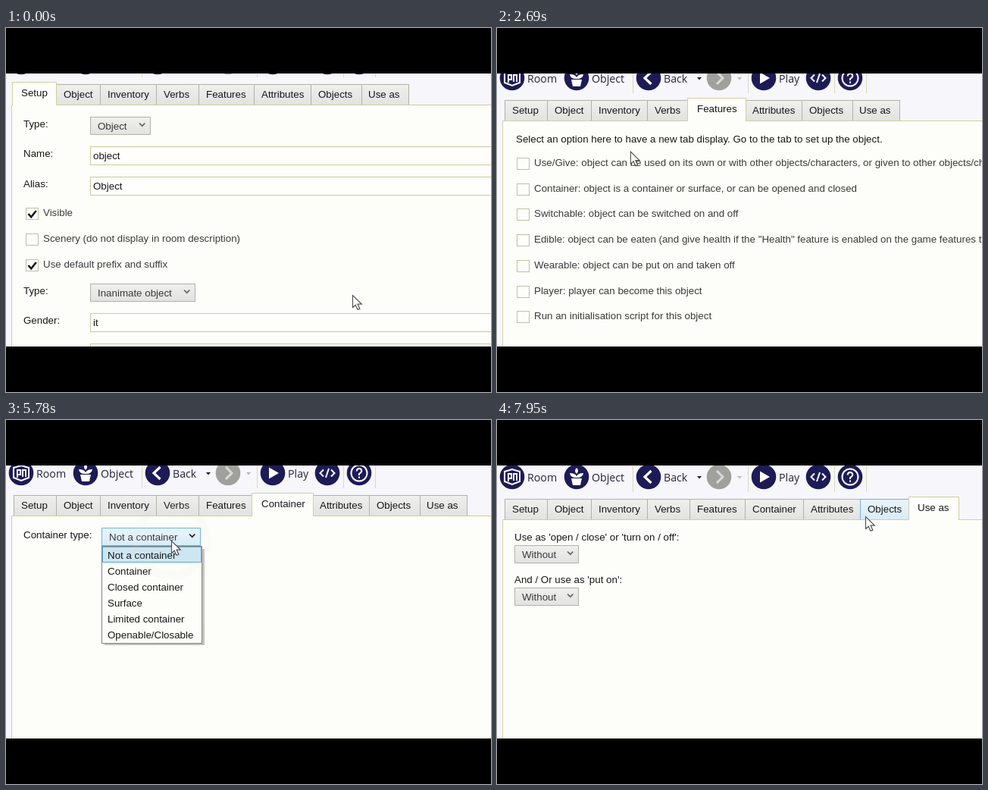
These frames come from a looping animation (640 by 480 pixels, 8000 ms). An HTML page:

```html
<!DOCTYPE html>
<html lang="en">
<head>
<meta charset="utf-8">
<title>Object editor</title>
<style>
html, body { margin: 0; width: 100%; height: 100%; overflow: hidden; background: #000; }
svg { display: block; width: 640px; height: 480px; }
text { font: 13.33px "Liberation Sans", Arial, sans-serif; fill: #17171a; white-space: pre; }
.soft { fill: #3a3a3c; }
.bar { font: 14.2px "Open Sans", "Noto Sans", sans-serif; fill: #25243a; }
.line { fill: none; stroke: #fff; stroke-width: 2; }
.thick { fill: none; stroke: #fff; stroke-width: 3.2; }
</style>
</head>
<body>
<svg viewBox="0 0 640 480">
  <defs>
    <clipPath id="view"><rect y="60" width="640" height="360"/></clipPath>
    <linearGradient id="grey" x2="0" y2="1">
      <stop stop-color="#efefed"/><stop offset="1" stop-color="#e2e2e1"/>
    </linearGradient>
    <linearGradient id="blue" x2="0" y2="1">
      <stop stop-color="#e8f4fc"/><stop offset="1" stop-color="#d9ecf9"/>
    </linearGradient>
  </defs>
  <rect width="640" height="480"/>
  <g clip-path="url(#view)">
    <rect y="60" width="640" height="360" fill="#f6f6fb"/>
    <g id="world">
      <g id="bar"></g>
      <g id="page"></g>
    </g>
    <circle id="ring" fill="none" stroke="#d2d2c8" stroke-width="11"/>
    <g id="cursor">
      <path d="M1.5 1.5V18l4-3.6 2.8 6.2 3-1.3-2.8-6h5.5z" fill="#777" opacity=".3"/>
      <path d="M.5.5V16.500l3.700-3.400 2.700 6.100 2.800-1.200L7 12h5.200z" fill="#fff" stroke="#4c4c50" stroke-width="1.1"/>
    </g>
  </g>
</svg>
<script>
const LOOP = 8000;
const $ = id => document.getElementById(id);

// Cursor stops: time, x, y
const MOVES = [
  [30, 457, 352], [450, 442, 330], [1100, 442, 330], [1800, 293, 109],
  [2200, 293, 109], [3150, 70, 211], [3800, 70, 211], [4440, 379, 110],
  [4930, 379, 110], [5380, 218, 159], [5850, 218, 159], [6150, 172, 203],
  [6500, 172, 203], [7230, 549, 108], [7280, 549, 108], [7400, 562, 110],
  [7540, 562, 110], [7930, 486, 127]
];
const PANS = [[1150, -25], [1800, -4], [3900, -4], [4440, 0], [7540, 0], [7930, 5]];
const CLICKS = [1950, 3245, 4480, 5380, 6250, 7440];
const PAGES = [[0, "Setup"], [2000, "Features"], [4530, "Container"], [7490, "Use as"]];
const CHECKED = 3350, MENU_OPEN = 5450, MENU_SHUT = 6300;

const TABS = [
  ["Setup", 10, 56], ["Object", 66, 58], ["Inventory", 124, 74], ["Verbs", 198, 56],
  ["Features", 254, 73], ["Container", 327, 77], ["Attributes", 404, 75],
  ["Objects", 479, 67], ["Use as", 546, 62]
];
const KINDS = ["Not a container", "Container", "Closed container", "Surface",
  "Limited container", "Openable/Closable"];
const FEATURES = [
  "Use/Give: object can be used on its own or with other objects/characters, or given to other objects/characters",
  "Container: object is a container or surface, or can be opened and closed",
  "Switchable: object can be switched on and off",
  "Edible: object can be eaten (and give health if the \"Health\" feature is enabled on the game features tab)",
  "Wearable: object can be put on and taken off",
  "Player: player can become this object",
  "Run an initialisation script for this object"
];
const OPTIONS = ["Can be opened", "Can be closed", "Is open", "Transparent",
  "Hide children until object is looked at", "List children when object is looked at or opened"];

const PAPER = "#fdfdfa", EDGE = "#b2b2a8", RULE = "#d0d09c", HOT_EDGE = "#6fb4da";

const ease = k => k * k * (3 - 2 * k);

function track(keys, t) {
  const i = keys.findIndex(k => k[0] > t);
  if (i < 0) return keys[keys.length - 1].slice(1);
  if (i === 0) return keys[0].slice(1);
  const a = keys[i - 1], b = keys[i], k = ease((t - a[0]) / (b[0] - a[0]));
  return a.slice(1).map((v, j) => v + (b[j + 1] - v) * k);
}

// y is the middle of the capital letters
const text = (x, y, s, cls = "") => `<text class="${cls}" x="${x}" y="${Math.round(y + 4.8)}">${s}</text>`;
const box = (x, y, w, h, fill, stroke) =>
  `<rect x="${x + .5}" y="${y + .5}" width="${w - 1}" height="${h - 1}" fill="${fill}" stroke="${stroke}"/>`;
const button = (x, y, w, h, hot) =>
  box(x, y, w, h, hot ? "url(#blue)" : "url(#grey)", hot ? HOT_EDGE : EDGE);
const inside = (p, x, y, w, h) => p.x >= x && p.x < x + w && p.y >= y && p.y < y + h;

function combo(p, x, y, w, label, lit) {
  const hot = lit || inside(p, x, y, w, 24);
  return button(x, y, w, 24, hot) + text(x + 10, y + 12.3, label, "soft") +
    `<path d="M${x + w - 15} ${y + 8.5}l3.7 3.7 3.7-3.7" fill="none" stroke="${hot ? "#222" : "#666"}" stroke-width="1.7"/>`;
}

const field = (x, y, s) => box(x, y, 700, 25, "#fefefc", "#cacaa0") + text(x + 4, y + 12.3, s);

function check(p, y, label, on) {
  const hot = inside(p, 26, y - 8, 280, 18);
  return box(26, y - 6, 17, 16, hot ? "#e2f0fb" : PAPER, hot ? "#5b9bd8" : "#c0c0a8") +
    (on ? `<path d="M29.5 ${y + 2}l3.7 4.3 6.6-8.3" fill="none" stroke="#151518" stroke-width="2.6"/>` : "") +
    text(49, y, label, "soft");
}

function tabs(p, page, full) {
  let front = "", back = "";
  for (const [name, left, w] of TABS) {
    if (name === "Container" && !full) continue;
    const x = !full && left > 327 ? left - 77 : left;
    const tx = x + (name === "Use as" ? 9 : 10);
    if (name === page) {
      const l = x - (name === "Setup" ? 2 : 3), r = x + w + (name === "Setup" ? 1 : 2);
      front = `<path d="M${l + .5} 127V96.5H${r - .5}V127" fill="${PAPER}" stroke="${RULE}"/>` + text(tx, 110.3, name);
    } else {
      back += button(x, 99, w + 1, 28, inside(p, x, 99, w, 27)) + text(tx, 112.3, name);
    }
  }
  return back + `<path d="M7.5 520V126.5H660V520" fill="${PAPER}" stroke="${RULE}"/>` + front;
}

const VIEWS = {
  "Setup": p =>
    text(23, 151.5, "Type:") + combo(p, 111, 142, 80, "Object") +
    text(23, 190.5, "Name:") + field(111, 181, "object") +
    text(23, 230.5, "Alias:") + field(111, 221, "Object") +
    check(p, 268, "Visible", true) +
    check(p, 302, "Scenery (do not display in room description)", false) +
    check(p, 336, "Use default prefix and suffix", true) +
    text(23, 371.5, "Type:") + combo(p, 111, 362, 139, "Inanimate object") +
    text(23, 410.5, "Gender:") + field(111, 401, "it") + field(111, 441, ""),

  "Features": (p, t) =>
    text(25, 150.5, "Select an option here to have a new tab display. Go to the tab to set up the object.") +
    FEATURES.map((s, i) => check(p, 181 + Math.round(i * 33.7), s, i === 1 && t >= CHECKED)).join(""),

  "Container": (p, t) => {
    const label = text(23, 151.5, "Container type:");
    if (t >= MENU_SHUT) {
      return label + combo(p, 127, 142, 98, "Container") +
        text(23, 190.5, "Contents prefix:") + field(127, 181, "containing") +
        OPTIONS.map((s, i) => check(p, 228 + i * 34, s, i < 3)).join("");
    }
    const open = t >= MENU_OPEN;
    return label + combo(p, 126, 142, 131, KINDS[0], open) + (open ? menu(p) : "");
  },

  "Use as": p =>
    text(23, 149.5, "Use as 'open / close' or 'turn on / off':") + combo(p, 23, 160, 85, "Without") +
    text(23, 205.5, "And / Or use as 'put on':") + combo(p, 23, 216, 85, "Without")
};

function menu(p) {
  const pick = Math.max(0, Math.floor((p.y - 167) / 21));
  return `<rect x="130" y="170" width="132" height="127" fill="#8c8c84" opacity=".5"/>` +
    box(126, 166, 133, 129, PAPER, "#85857c") +
    box(127, 167 + pick * 21, 131, 21, "#cde6f3", "#52a9cf") +
    KINDS.map((s, i) => text(134, 178.3 + i * 21, s)).join("");
}

function toolbar() {
  const icon = (x, art, fill = "#1d1b55") =>
    `<g transform="translate(${x} 70)"><circle r="16.3" fill="${fill}"/>${art}</g>`;
  const arrow = (x, fill) => `<path d="M${x - 3} 69h6l-3 3.5z" fill="${fill}"/>`;
  const rule = x => `<path d="M${x + .5} 40V90" stroke="#dcdcb4"/>`;
  const label = (x, s) => `<text class="bar" x="${x}" y="75.6">${s}</text>`;
  return [179, 331, 445, 487].map(rule).join("") +
    icon(20, `<path class="line" d="M-10-7L0-10 10-7V6L0 10-10 6ZM-5 6V-4H-1V2H-5M2 5V-4H6V5"/>`) +
    label(40, "Room") +
    icon(105, `<path d="M-7 2H7L5 11H-5ZM-1 1Q-8 1-9-5-2-5 0-1 2-5 9-5 8 1 1 1ZM0-4Q-4-8 0-12 4-8 0-4" fill="#fff"/>`) +
    label(125, "Object") +
    icon(200, `<path class="thick" d="M3.5-8L-5 0l8.5 8"/>`) +
    label(220, "Back") + arrow(267, "#222") +
    icon(293, `<path d="M-3-8L5 0l-8 8" fill="none" stroke="#dadad8" stroke-width="3"/>`, "#a0a09c") +
    arrow(320, "#b8b8b0") +
    icon(352, `<path d="M-5-7.5L8 0-5 7.5Z" fill="#fff"/>`) +
    label(372, "Play") +
    icon(424, `<path class="line" d="M-5-4.5L-9.5 0l4.5 4.5M5-4.5L9.5 0 5 4.5M2-6L-2 6"/>`) +
    icon(466, `<circle class="line" r="10.5"/><path class="line" d="M-3.3-2.5Q-3-6 0-6T3.3-3Q3.3-1 0 1v2M0 4.5v2.2"/>`);
}

let shown = "";

function draw(t) {
  const [x, y] = track(MOVES, t);
  const [pan] = track(PANS, t);
  const p = { x, y: y - pan };
  const page = PAGES.filter(k => k[0] <= t).pop()[1];
  const html = tabs(p, page, t >= CHECKED) + VIEWS[page](p, t);
  if (html !== shown) $("page").innerHTML = shown = html;

  $("world").setAttribute("transform", `translate(0 ${pan.toFixed(2)})`);
  $("cursor").setAttribute("transform", `translate(${x.toFixed(2)} ${y.toFixed(2)})`);

  const click = CLICKS.find(c => t >= c && t < c + 420);
  const ring = $("ring");
  if (click === undefined) {
    ring.setAttribute("opacity", 0);
  } else {
    const k = (t - click) / 420, [cx, cy] = track(MOVES, click);
    ring.setAttribute("cx", cx);
    ring.setAttribute("cy", cy);
    ring.setAttribute("r", 46 * (1 - (1 - k) ** 3));
    ring.setAttribute("opacity", .9 * (1 - k * k));
  }
}

$("bar").innerHTML = toolbar();
const start = performance.now();
function tick() {
  draw((performance.now() - start) % LOOP);
  requestAnimationFrame(tick);
}
tick();
</script>
</body>
</html>
```
